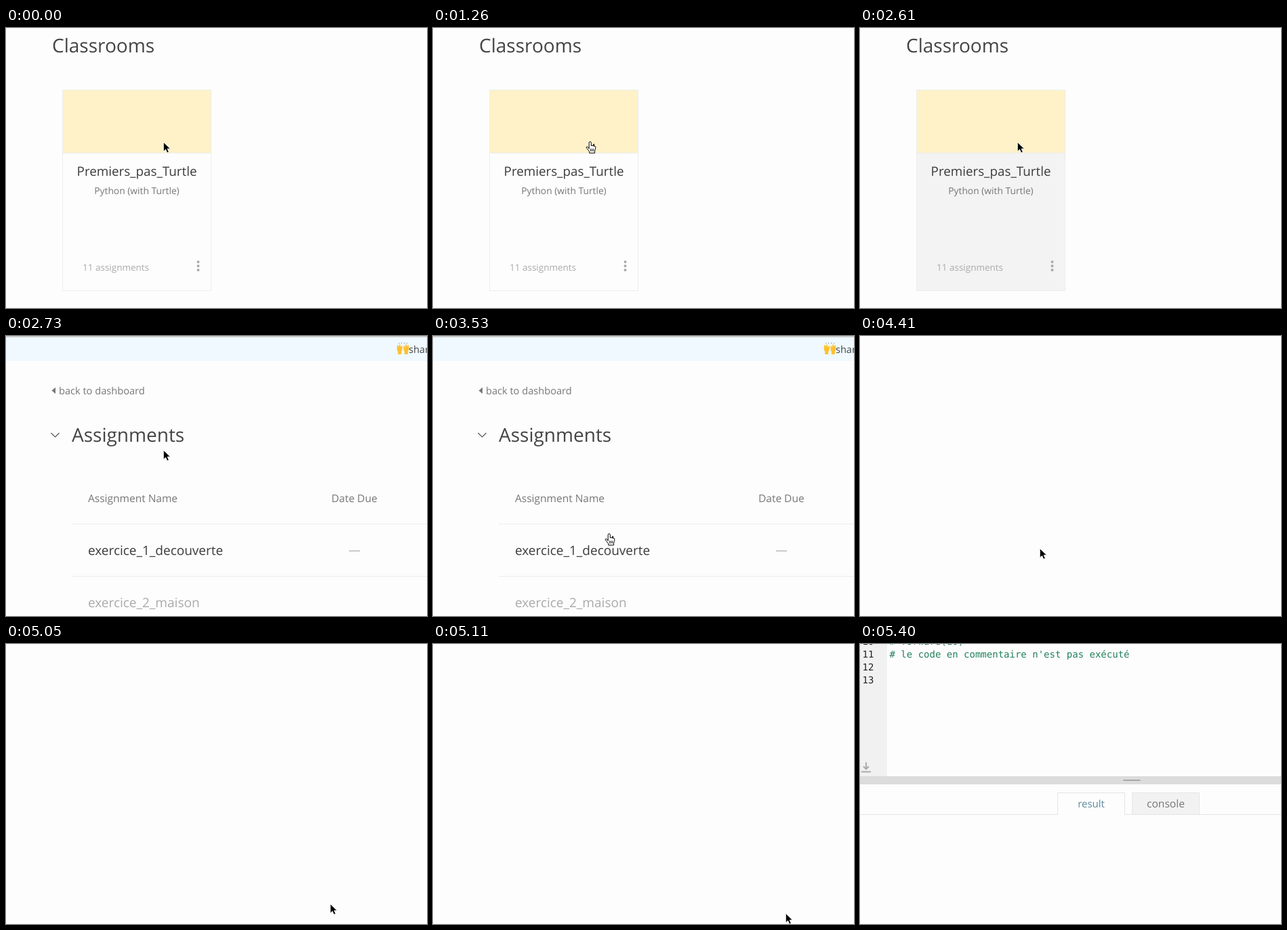
These frames come from a looping animation (621x413 px, 6840 ms). An HTML page:

```html
<!DOCTYPE html>
<html lang="en">
<head>
<meta charset="utf-8">
<title>Opening an assignment</title>
<style>
  html, body { margin: 0; width: 100%; height: 100%; overflow: hidden; background: #fdfdfd; }
  svg { display: block; width: 100%; height: 100%; }
  text { font-family: "Open Sans", sans-serif; fill: #777; text-rendering: geometricPrecision; }
  .title { font-size: 28px; fill: #444; }
  .item { font-size: 19px; fill: #3c3c3c; }
  .muted { fill: #aaa; }
  .column { font-size: 15.5px; }
  .code text { font: 14px "DejaVu Sans Mono", monospace; fill: #222; white-space: pre; }
  .code .comment { fill: #22805b; }
  .rule { stroke: #ededed; fill: none; }
</style>
</head>
<body>
<svg viewBox="0 0 621 413">
  <g id="dashboard">
    <text class="title" x="68" y="36">Classrooms</text>
    <rect id="card" class="rule" x="83.5" y="91.5" width="219" height="296"/>
    <rect x="84" y="92" width="218" height="92" fill="#fff2c8"/>
    <path class="rule" d="M84 184.5H302"/>
    <g text-anchor="middle">
      <text class="item" x="193" y="217.5" style="font-size:18.8px">Premiers_pas_Turtle</text>
      <text x="193" y="245" font-size="13.8">Python (with Turtle)</text>
    </g>
    <text class="muted" x="113" y="358" font-size="13.5">11 assignments</text>
    <g fill="#aaa">
      <circle cx="283.5" cy="345" r="2"/>
      <circle cx="283.5" cy="351" r="2"/>
      <circle cx="283.5" cy="357" r="2"/>
    </g>
  </g>

  <g id="assignments">
    <rect width="621" height="37" fill="#eff9ff"/>
    <rect width="621" height="2" fill="#cdcdcd"/>
    <g fill="#fdc02f">
      <path id="palm" d="M577 14l1.5-.8 1 3.3.6-3.8 1.6.1.5 3.6 1.5-1.9 1.2.8-.7 6.2-1 1.8v3.7h-5v-4l-1.6-3z"/>
      <use href="#palm" transform="matrix(-1 0 0 1 1171 0)"/>
    </g>
    <path d="M580 11.5l-.6-1.5M583.5 11.5l-.3-2M587.5 11.5l.3-2M591 11.5l.6-1.5" stroke="#8c99a5"/>
    <text x="594" y="25" font-size="14.5" style="fill:#444">share</text>
    <path d="M67.5 80.5l5.5-4.7v9.4z" fill="#777"/>
    <text x="78" y="86" font-size="14.6">back to dashboard</text>
    <path d="M66.5 143l6 6 6-6" fill="none" stroke="#555" stroke-width="1.2"/>
    <text class="title" x="97" y="156">Assignments</text>
    <text class="column" x="121" y="245">Assignment Name</text>
    <text class="column" x="480" y="245">Date Due</text>
    <path class="rule" d="M97 277.5H621M97 354.5H621"/>
    <text class="item" x="121" y="322.5">exercice_1_decouverte</text>
    <path d="M506 317H522" stroke="#aaa" stroke-width="1.2"/>
    <text class="item muted" x="121" y="399.5" style="fill:#aaa">exercice_2_maison</text>
  </g>

  <g id="editor">
    <rect width="40" height="195" fill="#f1f1f1"/>
    <g class="code">
      <text x="3.5" y="1">10</text>
      <text x="3.5" y="20">11</text>
      <text x="3.5" y="38.5">12</text>
      <text x="3.5" y="57.5">13</text>
      <text class="comment" x="43.5" y="1"># forward(10)</text>
      <text class="comment" x="43.5" y="20"># le code en commentaire n'est pas exécuté</text>
    </g>
    <path d="M9 174.5V184M5 180.5l4 4 4-4M2 188.5H16" fill="none" stroke="#aaa" stroke-width="2"/>
    <rect y="195" width="621" height="12" fill="#dcdcdc"/>
    <path d="M388.5 201H413.5" stroke="#a8a8a8" stroke-width="2"/>
    <rect x="401.5" y="219.5" width="99" height="32" fill="#f2f2f2" stroke="#e6e6e6"/>
    <path d="M0 251.5H291.5V219.5H390.5V251.5H621" fill="none" stroke="#e4e4e4"/>
    <g text-anchor="middle">
      <text x="341" y="241" font-size="15" style="fill:#5f8a9e">result</text>
      <text x="451" y="240.5" font-size="15.6">console</text>
    </g>
  </g>

  <path id="arrow" d="M.2 .2V14.3L3.5 11.2 5.7 16.3 8.4 15.1 6.2 10.2H10.6z" fill="#000" stroke="#fff"/>
  <g id="hand" stroke="#000" stroke-linejoin="round">
    <path fill="#fff" d="M-1.8 10V1.2Q-1.6-.4-.2-.4T1.3 1.2V5.6Q3.6 4.4 4 6.2 6-.5+5.6 6.6 7 5.6 7.9 7.2 7.9 11 6.6 13.2V16.4H-1.3V14.2L-5.6 8.8Q-6.2 7.2-4.6 7.1-3 7.6-1.8 10z"/>
    <path fill="none" stroke-width=".9" d="M.6 10v4M2.7 10v4M4.8 10v4"/>
  </g>
</svg>
<script>
const LOOP = 6840;
const byId = id => document.getElementById(id);
const scenes = [["dashboard", 0], ["assignments", 2730], ["blank", 4410], ["editor", 5400]];
const card = byId("card"), arrow = byId("arrow"), hand = byId("hand");
const points = { card: [232, 168], row: [265, 313], exit: [477, 383] };

const show = (element, visible) => element.style.display = visible ? "" : "none";
const mix = (from, to, amount) => from.map((v, i) => v + (to[i] - v) * amount);

function pointer(t) {
  if (t < 4750) {
    const u = Math.min(1, Math.max(0, (t - 3225) / 525));
    return mix(points.card, points.row, u * (3 - 2 * Math.sqrt(u)));
  }
  return mix(points.row, points.exit, (t - 4750) / 300);
}

function draw(now) {
  const t = now % LOOP;
  const scene = scenes.filter(([, start]) => t >= start).pop()[0];
  for (const [id] of scenes) if (byId(id)) show(byId(id), id === scene);
  card.style.fill = t < 2610 ? "#fdfdfd" : "#f3f3f3";

  const [x, y] = pointer(t);
  const overLink = (t >= 1260 && t < 2610) || (scene === "assignments" && y > 278);
  show(hand, overLink);
  show(arrow, !overLink && scene !== "editor");
  for (const cursor of [hand, arrow])
    cursor.setAttribute("transform", `translate(${Math.round(x)} ${Math.round(y)})`);
}

const start = performance.now();
function tick() {
  draw(performance.now() - start);
  requestAnimationFrame(tick);
}
tick();
</script>
</body>
</html>
```
